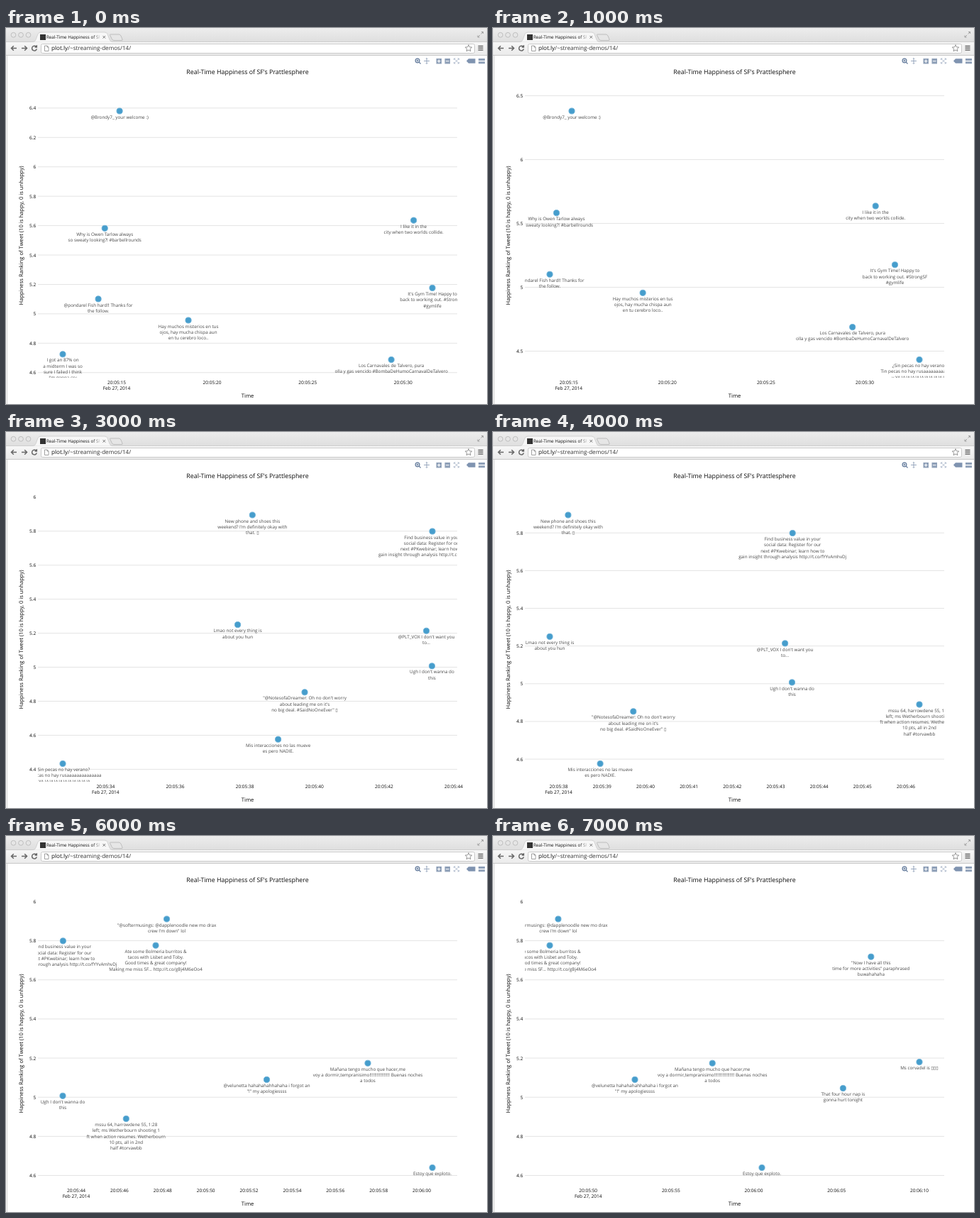
Animation of 678x530 px, one loop 8 s. Source, as an HTML page:

```html
<!DOCTYPE html>
<html lang="en">
<head>
<meta charset="utf-8">
<title>Real-Time Happiness</title>
<style>
html, body { margin: 0; width: 100%; height: 100%; overflow: hidden; background: #fff; }
svg { display: block; width: 678px; height: 530px; }
text { font-family: "Open Sans", "Noto Sans", sans-serif; fill: #0c0c0c; text-rendering: geometricPrecision; }
.tick { font-size: 6.56px; }
.tweet { font-size: 6.3px; fill: #484848; }
.mid { text-anchor: middle; }
.end { text-anchor: end; }
.grid { stroke: #e4e4e4; }
.dot { fill: #469dcc; stroke: #6db2d8; stroke-width: .9; }
.line { fill: none; stroke: #666; stroke-width: 1.5; }
</style>
</head>
<body>
<svg viewBox="0 0 678 530" xmlns="http://www.w3.org/2000/svg">
  <defs>
    <linearGradient id="bar" x2="0" y2="1"><stop stop-color="#ededed"/><stop offset="1" stop-color="#dedede"/></linearGradient>
    <linearGradient id="tools" x2="0" y2="1"><stop stop-color="#f7f7f7"/><stop offset="1" stop-color="#ebebeb"/></linearGradient>
    <linearGradient id="fade"><stop offset=".85" stop-color="#111"/><stop offset="1" stop-color="#111" stop-opacity="0"/></linearGradient>
    <clipPath id="plot"><rect x="45" y="92" width="591" height="401"/></clipPath>
    <clipPath id="tabClip"><rect x="56" y="6" width="76" height="13"/></clipPath>
  </defs>

  <!-- browser window -->
  <rect width="678" height="20" fill="url(#bar)"/>
  <g fill="#e6e6e6" stroke="#b4b4b4" stroke-width=".8">
    <circle cx="10.5" cy="9.8" r="3.4"/><circle cx="21" cy="9.8" r="3.4"/><circle cx="31.5" cy="9.8" r="3.4"/>
    <path d="M147 9h12q2 0 3 2l2 5q.5 1.5-1 1.5h-11q-2 0-2.7-2l-2.5-5q-.6-1.5.2-1.5z"/>
  </g>
  <path d="M0 19.5H38q3 0 4-3l3-8q1-2.500 4-2.500h90q3 0 4 2.500l3 8q1 3 4 3h528" fill="#f7f7f7" stroke="#c8c8c8" stroke-width=".7"/>
  <rect x="48" y="9" width="8" height="8" fill="#333"/>
  <g clip-path="url(#tabClip)"><text x="57" y="15.3" font-size="6.25" style="fill:url(#fade)">Real-Time Happiness of SF</text></g>
  <path class="line" style="stroke-width:.9" d="M136.5 11l3.6 3.6m0-3.6l-3.6 3.6"/>
  <path class="line" style="stroke-width:.9;stroke:#999" d="M669.5 8.5l3-3m-2.5 0h2.5v2.5M668 10l-3 3m0-2.5v2.5h2.5"/>
  <rect y="20" width="678" height="18" fill="url(#tools)"/>
  <path d="M0 38.5H678" stroke="#c8c8c8"/>
  <path d="M1.5 39V530" stroke="#d2d2d2"/>
  <g class="line">
    <path d="M15 28.5H7.5m3.3-3.3l-3.3 3.3l3.3 3.3M22 28.5h7.5m-3.3-3.3l3.3 3.3l-3.3 3.3"/>
    <path d="M42.5 26.3a3.4 3.4 0 1 0 .8 3.2M43.3 24.3v2.7h-2.7"/>
  </g>
  <rect x="49.5" y="22.5" width="611" height="13" rx="2" fill="#fff" stroke="#c4c4c4" stroke-width=".9"/>
  <path d="M54.5 25h3.5l2 2v5.5h-5.5zM58 25v2h2" fill="#fff" stroke="#888" stroke-width=".8"/>
  <text x="64" y="31.3" font-size="8.1">plot.ly<tspan fill="#333">/~streaming-demos/14/</tspan></text>
  <path id="star" fill="#fff" stroke="#888" stroke-width=".9"/>
  <path d="M665.5 25.5h7m-7 2.8h7m-7 2.8h7" stroke="#666" stroke-width="1.5"/>

  <!-- plot toolbar -->
  <g fill="none" stroke="#8fa0b8" stroke-width="1.2">
    <g stroke="#5f7799"><circle cx="580" cy="46" r="2.9"/><path d="M582.2 48.2l2.3 2.3M578.5 46h3m-1.5-1.5v3"/></g>
    <path d="M589 46.5h8m-4-4v8M591.8 43.7l1.2-1.2l1.2 1.2m-2.4 5.600l1.2 1.2l1.2-1.2" stroke-width=".9"/>
    <path d="M631.5 43l7 7m0-7l-7 7M631.5 45v-2h2m3 0h2v2m0 3v2h-2m-3 0h-2v-2" stroke-width=".65"/>
    <g fill="#8fa0b8" stroke="none">
      <rect x="606.5" y="43" width="7.5" height="7.5"/><rect x="618.5" y="43" width="7.5" height="7.5"/>
      <path d="M649 46.5l3-3.2h9.5v6.5h-9.5z" fill="#7f93b0"/>
      <rect x="666" y="43" width="9" height="3"/><rect x="666" y="47.3" width="9" height="3"/>
    </g>
    <path d="M608 46.75h4.5m-2.25-2.25v4.5M620 46.75h4.5" stroke="#fff"/>
  </g>

  <text class="mid" x="340.5" y="64.6" font-size="8.87">Real-Time Happiness of SF's Prattlesphere</text>
  <text class="mid" font-size="7.65" transform="translate(24.3 292.5) rotate(-90)">Happiness Ranking of Tweet (10 is happy, 0 is unhappy)</text>
  <text class="mid" x="340.5" y="521" font-size="7.65">Time</text>
  <g id="chart"></g>
</svg>

<script>
// seconds after 20:05:00, ranking, text lines
const tweets = [
  [12.18, 4.725, "I got an 87% on|a midterm I was so|sure I failed I think|I'm gonna cry"],
  [14.04, 5.101, "@pondarel Fish hard!! Thanks for|the follow."],
  [14.38, 5.582, "Why is Owen Tarlow always|so sweaty looking?! #barbellrounds"],
  [15.155, 6.38, "@Brondy7_ your welcome :)"],
  [18.755, 4.956, "Hay muchos misterios en tus|ojos, hay mucha chispa aun|en tu cerebro loco.."],
  [29.38, 4.688, "Los Carnavales de Talvero, pura|olla y gas vencido #BombaDeHumoCarnavalDeTalvero"],
  [30.55, 5.636, "I like it in the|city when two worlds collide."],
  [31.53, 5.176, "It's Gym Time! Happy to|back to working out. #StrongSF|#gymlife"],
  [32.77, 4.433, "¿Sin pecas no hay verano?|Tin pecas no hay rus" + "a".repeat(14) + "|y YA " + "JA".repeat(10)],
  [37.795, 5.25, "Lmao not every thing is|about you hun"],
  [38.218, 5.895, "New phone and shoes this|weekend? I'm definitely okay with|that. ▯"],
  [38.957, 4.576, "Mis interacciones no las mueve|es pero NADIE."],
  [39.72, 4.853, "\"@NotesofaDreamer: Oh no don't worry|about leading me on it's|no big deal. #SaidNoOneEver\" ▯"],
  [43.215, 5.214, "@PLT_VOX I don't want you|to..."],
  [43.376, 5.007, "Ugh I don't wanna do|this"],
  [43.388, 5.799, "Find business value in your|social data: Register for our|next #PKwebinar; learn how to|gain insight through analysis http://t.co/fYYvAmhvDj"],
  [46.31, 4.89, "mssu 64, harrowdene 55, 1:28|left; ms Wetherbourn shooting 1|ft when action resumes. Wetherbourn|10 pts, all in 2nd|half #torvawbb"],
  [47.68, 5.776, "Ate some Bolmeria burritos &|tacos with Lisbet and Toby.|Good times & great company!|Making me miss SF... http://t.co/gBj4M6eOo4"],
  [48.19, 5.911, "\"@softermusings: @dapplenoodle new mo drax|crew I'm down\" lol"],
  [52.82, 5.09, "@velunetta hahahahahhahaha i forgot an|\"!\" my apologiessss"],
  [57.5, 5.174, "Mañana tengo mucho que hacer,me|voy a dormir,tempranisimo" + "!".repeat(17) + " Buenas noches|a todos"],
  [60.49, 4.64, "Estoy que exploto."],
  [65.39, 5.046, "That four hour nap is|gonna hurt tonight"],
  [67.08, 5.718, "\"Now I have all this|time for more activities\" paraphrased|buwahahaha"],
  [70, 5.18, "Ms corvadel is ▯▯▯"]
];
const STEP = 1000, SIZE = 8;
const starts = [0, 1, 4, 8, 9, 12, 14, 17];   // first tweet of the window at each step
const box = { left: 45, right: 636, top: 91.5, bottom: 493 };
const chart = document.getElementById("chart");

function add(parent, name, attrs, text) {
  const el = document.createElementNS("http://www.w3.org/2000/svg", name);
  for (const key in attrs) el.setAttribute(key, attrs[key]);
  if (text !== undefined) el.textContent = text;
  parent.append(el);
  return el;
}

// Linear axis that maps the data's extent to pixels from a to b
function axis(values, a, b) {
  const lo = Math.min(...values), scale = (b - a) / (Math.max(...values) - lo);
  return { at: v => a + (v - lo) * scale, inv: p => lo + (p - a) / scale };
}

function ticks(from, to) {
  const step = [.1, .2, .5, 1, 2, 5].find(s => s >= (to - from) / 10);
  const list = [];
  for (let k = Math.ceil(from / step); k * step <= to; k++) list.push(k * step);
  return list;
}

const clock = s => `20:0${5 + Math.floor(s / 60)}:${String(Math.round(s) % 60).padStart(2, "0")}`;

function draw(start) {
  const shown = tweets.slice(start, start + SIZE);
  const x = axis(shown.map(t => t[0]), 80, 601);
  const y = axis(shown.map(t => t[1]), 467.5, 117);
  chart.replaceChildren();

  for (const v of ticks(y.inv(box.bottom), y.inv(box.top))) {
    const py = y.at(v);
    if (py > 93) add(chart, "path", { class: "grid", d: `M${box.left} ${py}H${box.right}` });
    add(chart, "text", { class: "tick end", x: 42.3, y: py + 2.5 }, +v.toFixed(1));
  }
  ticks(x.inv(box.left), x.inv(box.right)).forEach((v, i) => {
    add(chart, "text", { class: "tick mid", x: x.at(v), y: 502 }, clock(v));
    if (!i) add(chart, "text", { class: "tick mid", x: x.at(v), y: 510.2 }, "Feb 27, 2014");
  });

  const plot = add(chart, "g", { "clip-path": "url(#plot)" });
  for (const [t, rank] of shown)
    add(plot, "circle", { class: "dot", cx: x.at(t), cy: y.at(rank), r: 4.1 });
  for (const [t, rank, words] of shown)
    words.split("|").forEach((line, i) =>
      add(plot, "text", { class: "tweet mid", x: x.at(t), y: y.at(rank) + 10.6 + i * 8.27 }, line));
}

const corners = Array.from({ length: 10 }, (_, i) => {
  const r = i % 2 ? 2.3 : 5, a = (i / 5 - .5) * Math.PI;
  return `${652 + r * Math.cos(a)} ${28.7 + r * Math.sin(a)}`;
});
document.getElementById("star").setAttribute("d", `M${corners.join("L")}Z`);

let current = -1;
const begin = performance.now();
function tick(now) {
  const i = Math.floor(Math.max(0, now - begin) / STEP) % starts.length;
  if (i !== current) draw(starts[current = i]);
  requestAnimationFrame(tick);
}
tick(begin);
</script>
</body>
</html>
```
